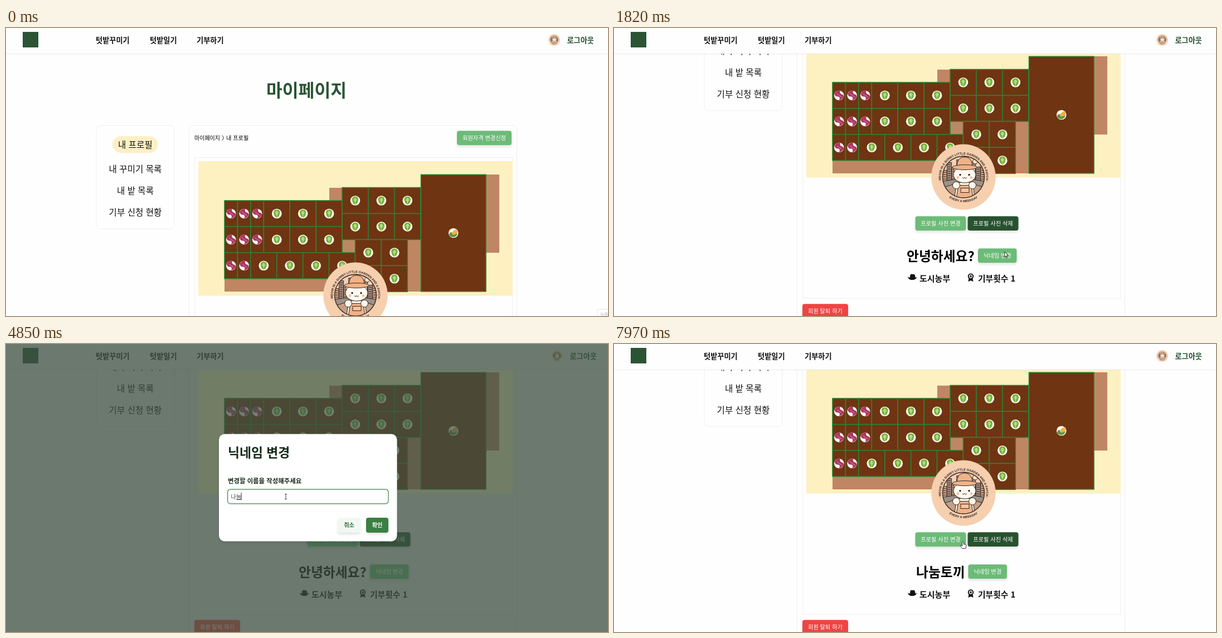
Animation, 1080 px wide and 519 px high, one loop 8000 ms. Source, as an HTML page:

```html
<!DOCTYPE html>
<html lang="ko">
<head>
<meta charset="utf-8">
<title>마이페이지</title>
<style>
  html, body { margin: 0; width: 100%; height: 100%; overflow: hidden; background: #fefefe; }
  svg { display: block; width: 100vw; height: 100vh; font-family: 'Noto Sans CJK KR', 'Noto Sans CJK', sans-serif; }
  .page { fill: var(--page); }
  .card { fill: var(--page); stroke: #00000010; }
  .lift { filter: drop-shadow(0 3px 2px #0000001c); }
  .ring { font: bold 5.7px 'Liberation Sans', sans-serif; fill: #33241f; text-anchor: middle; }
</style>
</head>
<body>
<svg id="stage" viewBox="0 0 1080 519"></svg>
<script>
const LOOP = 8000;
const stage = document.getElementById('stage');
const GREEN = '#6cbb78', DARK = '#28522f';

// ---- drawing helpers -------------------------------------------------
const rect = (x, y, w, h, fill, rest = '') =>
  `<rect x="${x}" y="${y}" width="${w}" height="${h}" fill="${fill}" ${rest}/>`;
const box = (cls, x, y, w, h, r = 0) =>
  `<rect class="${cls}" x="${x}" y="${y}" width="${w}" height="${h}" rx="${r}"/>`;
const text = (s, x, cy, size, fill = '#000', weight = 400, anchor = 'start') =>
  `<text x="${x}" y="${cy + size * .38}" font-size="${size}" fill="${fill}" font-weight="${weight}" text-anchor="${anchor}">${s}</text>`;
const button = (s, x, y, w, fill, color = '#fff', weight = 400, h = 25.7) =>
  rect(x, y, w, h, fill, 'rx="4" class="lift"') + text(s, x + w / 2, y + h / 2, 10.2, color, weight, 'middle');
const use = (id, x, y, scale = 1) => `<use href="#${id}" transform="translate(${x} ${y}) scale(${scale})"/>`;
const path = (d, fill, rest = '') => `<path d="${d}" fill="${fill}" ${rest}/>`;

// ---- garden ----------------------------------------------------------
function garden() {
  const u = 23.45, cell = 2 * u, left = 392, top = 311;
  let out = rect(345, 240, 564, 242.5, '#fef1c1');
  out += rect(392, 311, 352, 164, '#c08663') + rect(580, 288, 164, 30, '#c08663') + rect(744, 264, 141, 141, '#c08663');
  const plot = (x, y, w, h, crop) => {
    out += rect(x, y, w, h, '#6f3411', 'stroke="#2f8038" stroke-width="1.6"') + use(crop, x + w / 2, y + h / 2);
  };
  const row = (x, y, count, w, crop) => {
    for (let i = 0; i < count; i++) plot(left + (x + i * w) * u, top + y * u, w * u, cell, crop);
  };
  for (const y of [0, 2]) { row(0, y, 3, 1, 'beet'); row(3, y, 3, 2, 'lettuce'); }
  row(0, 4, 2, 1, 'beet');
  row(2, 4, 4, 2, 'lettuce');
  for (const y of [-1, 1]) row(9, y, 3, 2, 'lettuce');
  for (const y of [3, 5]) row(10, y, 2, 2, 'lettuce');
  plot(744.5, 264.3, 116.5, 210.5, 'corn');
  return out;
}

// Jagged lumps of earth, each with a dark shadow; lumps grow towards the viewer.
function soil() {
  let seed = 7;
  const rnd = () => (seed = seed * 16807 % 2147483647) / 2147483647;
  const tones = ['#a9693d', '#8f5630', '#b87746', '#9a5f37'];
  const count = 420;
  let out = rect(345, 240, 564, 242.5, '#75452a');
  for (let i = 0; i < count; i++) {
    const depth = i / count, x = 345 + rnd() * 564, y = 238 + depth * 244, size = 6 + (6 + 8 * depth) * rnd();
    const points = Array.from({ length: 9 }, (_, k) => {
      const a = k * Math.PI / 4.5, r = size * (.5 + rnd() * .6);
      return `${(r * Math.cos(a)).toFixed(1)},${(r * .6 * Math.sin(a)).toFixed(1)}`;
    }).join(' ');
    out += `<g transform="translate(${x.toFixed(1)} ${y.toFixed(1)})"><polygon points="${points}" fill="#432619" transform="translate(-1 3)"/>` +
      `<polygon points="${points}" fill="${tones[i % 4]}"/></g>`;
  }
  return `<clipPath id="frame">${rect(345, 240, 564, 242.5, '#000', 'rx="2"')}</clipPath><g clip-path="url(#frame)">${out}</g>`;
}

// ---- badge with a gardening cat ---------------------------------------
function badge() {
  const line = 'stroke="#33241f" stroke-width="1"';
  let town = '';
  for (let i = 0; i < 9; i++) {
    const x = -38 + i * 8.6, h = 22 + (i * 37 % 23);
    town += rect(x, 10 - h, 8, h, i % 2 ? '#a58f83' : '#d6a583', line);
    for (let y = 13 - h; y < 6; y += 4) town += rect(x + 1.5, y, 5, 1.4, '#4a3a34');
  }
  return `<ellipse rx="57.7" ry="59" fill="#f6cfae"/>
    <g class="ring">
      <path id="upper" d="M-28 29.3A40.5 40.5 0 1 1 28 29.3" fill="none"/>
      <path id="lower" d="M-38 24.9A45.4 45.4 0 0 0 38 24.9" fill="none"/>
      <text><textPath href="#upper" startOffset="50%">· MEOW IN A SUNNY LITTLE GARDEN AND A PATCH ·</textPath></text>
      <text><textPath href="#lower" startOffset="50%">EVERY A WEEKDAY</textPath></text>
    </g>
    <clipPath id="disc"><circle r="37.5"/></clipPath>
    <g clip-path="url(#disc)">
      <circle r="38" fill="#f3d2b6"/>${town}
      <circle cx="21" cy="-28" r="4.5" fill="#f8dfc4" ${line}/>
      ${path('M-40 8Q0 0 40 8V40H-40Z', '#9b9189', line)}
      ${path('M-40 20L-14 12V40H-40ZM40 20L16 12V40H40Z', '#c5a088', line)}
      ${path('M-13 12Q2 6 17 12L20 38H-16Z', '#fff6ea', line)}
      ${path('M-9 15H14L17 38H-13Z', '#f0b286', line)}
      ${rect(-5, 20, 15, 8, '#f5c49e', line)}
      ${path('M-17-8L-17-19L-8-16ZM21-8L21-19L12-16Z', '#fff6ea', line)}
      <ellipse cx="2" cy="-4" rx="20" ry="14.5" fill="#fff9f0" ${line}/>
      ${path('M-12-18Q-12-36 2-36T16-18Z', '#f0b286', line)}
      <ellipse cx="2" cy="-17.5" rx="22" ry="4.5" fill="#f0b286" ${line}/>
      <circle cx="-13" cy="15" r="6.5" fill="#fff6ea" ${line}/><circle cx="16" cy="15" r="6.5" fill="#fff6ea" ${line}/>
      <circle cx="-6" cy="-4" r="1.6"/><circle cx="10" cy="-4" r="1.6"/>
      <circle cx="-10" cy="1" r="2.4" fill="#f6c3a4"/><circle cx="14" cy="1" r="2.4" fill="#f6c3a4"/>
      ${path('M-2 1Q0 4 2 1Q4 4 6 1', 'none', line)}
    </g>
    <circle r="37.5" fill="none" stroke="#33241f" stroke-width="1.4"/>`;
}

const pointer = 'stroke="#222" stroke-width=".9" stroke-linejoin="round"';
const leaf = 'M0-7.2C4-7.5 6.5-4 5.5-1 5.2 3 3 7 0 7S-5.2 3-5.5-1C-6.5-4-4-7.500 0-7.200Z';
const defs = `<defs>
  <g id="beet"><circle r="8.8" fill="#fdf5f7"/>
    ${path('M-8-3A8.6 8.6 0 0 1 2-8.3Q0-3 6-1.500Q9 0 8.300 3Q5 8 0 8.400Q3 4-1 2Q-7 3-8-3Z', '#ad3560')}
    ${path('M-4-3Q0 0 5 3', 'none', 'stroke="#dc8fa9"')}</g>
  <g id="lettuce"><circle r="8.8" fill="#fbfdf6"/>${path(leaf, '#75b03a')}
    ${path('M0 6V-5M0 2L-3-2M0 2L3-2M0-1L-2-4M0-1L2-4', 'none', 'stroke="#c9e59a" stroke-width="1.1"')}</g>
  <g id="corn"><circle r="8.8" fill="#fbf8ee"/>
    <ellipse cx="1.5" cy="-1.5" rx="4" ry="7" fill="#eeb04a" transform="rotate(38)"/>
    ${path('M-8 3Q-5-4-3-1Q-3 4 2 3Q5 1 7 1Q6 6 1 7.500Q-5 8-8 3Z', '#5c9440')}</g>
  <g id="badge">${badge()}</g>
  <g id="garden">${garden()}</g>
  <g id="soil">${soil()}</g>
  <g id="arrow">${path('M0 0V9.500L2.200 7.600 3.600 10.800 5 10.200 3.600 7.200H6.500Z', '#fff', pointer)}</g>
  <g id="hand">${path('M-1.300 1Q0-.7 1.300 1V4.500L5 5.600Q6 6 5.800 8L5 12.500H-1L-4.500 8Q-4.500 6-3 6.500L-1.300 8Z', '#fff', pointer)}</g>
  <g id="beam">${path('M-2-4.500H2M0-4.500V4.500M-2 4.500H2', 'none', 'stroke="#333" stroke-width=".9"')}</g>
</defs>`;

// ---- page ------------------------------------------------------------
const sidebar = box('card', 162, 175.5, 140, 186.5, 8) + rect(191, 195, 81.5, 30, '#fef0c4', 'rx="15"') +
  ['내 프로필', '내 꾸미기 목록', '내 밭 목록', '기부 신청 현황']
    .map((s, i) => text(s, 232, [210.5, 254.5, 293.5, 332.5][i], 15.6, '#111', 400, 'middle')).join('');

const stats =
  path('M527 661Q530 664 531 662Q531 656 534 656.500T538 656.500Q540 657 540.500 662Q541 664 543.500 661Q542 667 535 667T527 661Z', '#111') +
  path('M636.500 664L635.500 670 640 668 644.500 670 643.500 664Z', '#111') +
  '<circle cx="640" cy="660.500" r="4.200" fill="none" stroke="#111" stroke-width="2"/><circle cx="640" cy="660.500" r="1.800"/>' +
  text('도시농부', 548, 664, 15, '#111', 700) + text('기부횟수 1', 653, 664, 14.8, '#111', 700);

function profile(name, nameX, buttonX, loaded) {
  const end = loaded ? 700 : 680;
  return box('card', 328.5, 175.5, 588, end - 129.5, 8) +
    text('마이페이지', 338, 198, 10) + path('M388 193.500L390.500 198L388 202.500', 'none', 'stroke="#222"') +
    text('내 프로필', 395, 198, 10.2) + button('회원자격 변경신청', 809, 185.3, 98, GREEN) +
    box('card', 338.5, 233.5, 570, end - 233.5) +
    use(loaded ? 'garden' : 'soil', 0, 0) +
    (loaded ? use('badge', 627, 481.5) : '<ellipse cx="627" cy="481.500" rx="57.700" ry="59" fill="#d9d9d9"/>') +
    button('프로필 사진 변경', 540.5, 552.3, 91, GREEN) + button('프로필 사진 삭제', 634.5, 552.3, 91, DARK) +
    text(name, nameX, 624, 23.8, '#000', 700) + button('닉네임 변경', buttonX, 610.3, 69.5, GREEN) +
    (loaded ? stats : '') + button('회원 탈퇴 하기', 338, end + 10.3, 82, '#ef4444');
}

const header = box('page', 0, 0, 1080, 46.5) + rect(0, 46, 1080, 1, '#00000012') +
  rect(30, 7, 28, 28, '#2b5434') +
  [['텃밭꾸미기', 161], ['텃밭일기', 258], ['기부하기', 342]].map(([s, x]) => text(s, x, 22, 13.2, '#111', 700)).join('');

const modal = rect(382, 162.3, 319.5, 193.2, '#fff', 'rx="10" class="lift"') +
  text('닉네임 변경', 398, 195, 22.8, '#14291a', 700) +
  text('변경할 이름을 작성해주세요', 398, 247, 11.4, '#14291a', 700) +
  rect(397.6, 261.8, 288.3, 26, '#fff', 'rx="5" stroke="#3b8145" stroke-width="1.2"') +
  '<text id="field" x="403.500" y="278.600" font-size="10.100"></text>' +
  '<rect id="under" y="280" width="9.300" height=".8" fill="#444"/><rect id="caret" y="268" width=".9" height="13"/>' +
  button('취소', 595.5, 313, 40, '#f1f8f2', '#2f6b3a', 700, 27) + button('확인', 646, 313, 40, '#3a8042', '#fff', 700, 27);

stage.innerHTML = defs + box('page', 0, 0, 1080, 519) + `
  <g id="scroller">
    <g id="title">${text('마이페이지', 539, 112, 31.3, '#2b5434', 900, 'middle')}</g>
    <g id="side">${sidebar}</g>
    <g id="before">${profile('안녕하세요?', 525, 653, true)}</g>
    <g id="loading" transform="translate(-50 0)">${profile('유저 닉네임', 529, 649, false)}</g>
    <g id="after">${profile('나눔토끼', 542, 635.5, true)}</g>
  </g>
  ${header}
  <g id="member">${use('badge', 983.5, 21.5, .18)}${text('로그아웃', 1055, 22, 13.2, '#1f4d2b', 700, 'end')}</g>
  <g id="guest">${text('로그인', 1055, 22, 13.2, '#1f4d2b', 700, 'end')}</g>
  <g id="corner">${rect(1061, 507, 30, 20, '#fff', 'stroke="#e4e4e4"')}${text('녹화', 1066, 516, 8, '#bbb')}</g>
  <rect id="shade" width="1080" height="519" fill="#3d5143"/>
  <g id="modal">${modal}</g>
  <use id="cursor"/>`;

// ---- motion ----------------------------------------------------------
const el = id => document.getElementById(id);
const show = (id, on) => el(id).style.display = on ? '' : 'none';
const ramp = (t, a, b) => Math.min(1, Math.max(0, (t - a) / (b - a)));
const smooth = p => p * p * (3 - 2 * p);

const mouse = [[400, 938, 512], [1070, 705, 402], [1750, 705, 402], [1960, 689, 406], [2420, 689, 406],
  [2920, 524, 276], [3120, 524, 276], [3190, 502, 275], [6500, 502, 275], [6800, 662, 320],
  [7560, 662, 320], [7960, 626, 356]];
const typing = [[2940, ''], [3670, 'ㄴ'], [3800, '나'], [3930, '나ㄴ'], [4390, '나누'], [4850, '나눔'],
  [5710, '나눔ㅌ'], [5800, '나눔토'], [5960, '나눔토ㄲ'], [6050, '나눔토끼']];

function mouseAt(t) {
  const i = mouse.findIndex(k => k[0] > t);
  if (i < 1) return mouse[i < 0 ? mouse.length - 1 : 0].slice(1);
  const [a, ax, ay] = mouse[i - 1], [b, bx, by] = mouse[i], p = smooth(ramp(t, a, b));
  return [ax + (bx - ax) * p, ay + (by - ay) * p];
}

function cursorAt(t) {
  if ((t >= 2030 && t < 2230) || (t >= 6700 && t < 7280) || t >= 7800) return 'hand';
  return t >= 2800 && t < 6650 ? 'beam' : 'arrow';
}

function drawField(t) {
  const [since, value] = typing.filter(k => k[0] <= t).pop() || [Infinity, ''];
  const end = 403.5 + value.length * 9.3;
  el('field').textContent = value || '변경할 닉네임';
  el('field').setAttribute('fill', value ? '#444' : '#aaa');
  el('under').setAttribute('x', end - 9.3);
  el('caret').setAttribute('x', end - .5);
  show('under', value);
  show('caret', t >= since && Math.floor((t - since) / 530) % 2 === 0);
}

function draw(t) {
  const loading = t >= 7350 && t < 7490, open = t >= 2230 && t < 7280;
  const scroll = 71 * [1125, 1290, 1600].reduce((sum, s) => sum + smooth(ramp(t, s, s + 150)), 0);
  el('scroller').setAttribute('transform', `translate(0 ${-scroll})`);
  show('side', !loading);
  show('before', t < 7350);
  show('loading', loading);
  show('after', t >= 7490);
  show('member', !loading);
  show('guest', loading);
  show('corner', t < 70);
  el('member').setAttribute('transform', `translate(${open ? 5 : 0} 0)`);

  const out = 1 - ramp(t, 7080, 7280);
  const dim = ramp(t, 2200, 2340) * out;
  const pop = smooth(ramp(t, 2380, 2600)) * out;
  const tone = 254 - 28 * dim;
  stage.style.setProperty('--page', `rgb(${tone},${tone},${tone})`);
  el('shade').setAttribute('opacity', .72 * dim);
  el('modal').setAttribute('opacity', pop);
  el('modal').setAttribute('transform', `translate(541.7 259) scale(${.9 + .1 * pop}) translate(-541.7 -259)`);
  drawField(t);

  const [x, y] = mouseAt(t);
  el('cursor').setAttribute('href', '#' + cursorAt(t));
  el('cursor').setAttribute('transform', `translate(${x} ${y})`);
  show('cursor', t >= 400);
}

function tick() {
  draw(performance.now() % LOOP);
  requestAnimationFrame(tick);
}
tick();
</script>
</body>
</html>
```
